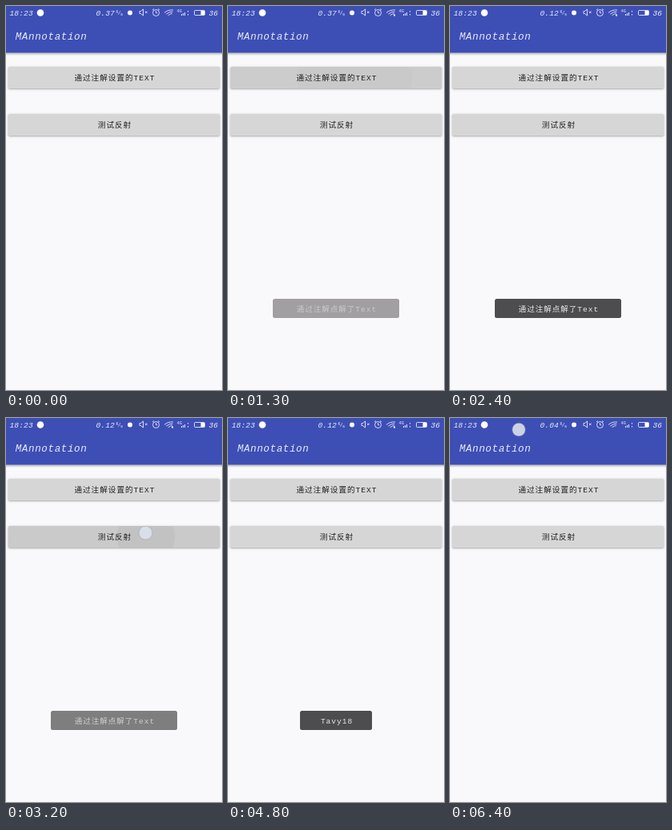
Write an HTML page with a canvas that moves like this. It is 270 px wide and 480 px high and loops after 6500 ms.

```html
<!DOCTYPE html>
<html lang="zh-CN">
<head>
<meta charset="utf-8">
<style>
html, body { margin: 0; width: 100%; height: 100%; overflow: hidden; background: #f9f8fa; }
canvas { display: block; width: 270px; height: 480px; }
</style>
</head>
<body>
<canvas id="stage" width="270" height="480"></canvas>
<script>
const ctx = document.getElementById('stage').getContext('2d');
const LOOP = 6500, STEP = 100;
const FAMILY = '"Liberation Mono", "Noto Sans CJK SC", "Noto Sans CJK", monospace';
const LIGHT = 'rgba(255,255,255,.88)';
const clamp = v => Math.max(0, Math.min(1, v));
const ramp = (t, from, to) => clamp((t - from) / (to - from));
const within = (t, from, to) => t >= from && t < to;

function text(str, x, y, size, { color = LIGHT, align = 'left', style = '', gap = 0 } = {}) {
  ctx.font = `${style} 300 ${size}px ${FAMILY}`;
  ctx.letterSpacing = `${gap}px`;
  ctx.textAlign = align;
  ctx.fillStyle = color;
  ctx.fillText(str, x, y);
}

function roundRect(x, y, w, h, r) {
  ctx.beginPath();
  ctx.roundRect(x, y, w, h, r);
}

function disc(x, y, r, color) {
  ctx.beginPath();
  ctx.arc(x, y, r, 0, Math.PI * 2);
  ctx.fillStyle = color;
  ctx.fill();
}

function line(...pts) {
  ctx.beginPath();
  for (let i = 0; i < pts.length; i += 2) ctx.lineTo(pts[i], pts[i + 1]);
  ctx.stroke();
}

function drawMute() {
  line(167, 6.5, 168.5, 6.5, 171.5, 4, 171.5, 12, 168.5, 9.5, 167, 9.5, 167, 6.5);
  line(174, 6.5, 176.5, 9);
  line(176.5, 6.5, 174, 9);
}

function drawAlarm() {
  ctx.beginPath();
  ctx.arc(187.5, 8.5, 4, 0, Math.PI * 2);
  ctx.stroke();
  line(187.5, 6, 187.5, 8.7, 189.3, 8.7);
  line(183, 5, 185, 3.5);
  line(190, 3.5, 192, 5);
}

function drawWifi(active) {
  for (let i = 0; i < 3; i++) {
    const x = 198 + i * 2.3, y = 8.5 + i * 1.6;
    ctx.beginPath();
    ctx.moveTo(x, y);
    ctx.quadraticCurveTo(x + 4, y - 4 + i * 0.6, 209 - i * 0.6, 5 + i * 2.3);
    ctx.stroke();
  }
  if (active) {
    ctx.fillStyle = '#fff';
    ctx.fillRect(207, 10.5, 2, 2);
  }
}

function drawSignal() {
  text('4G', 213.5, 8, 5.5);
  for (let i = 0; i < 3; i++) ctx.fillRect(219 + i * 2, 10 - i, 1, 2 + i);
  ctx.fillRect(227, 6, 1, 1.5);
  ctx.fillRect(227, 10, 1, 1.5);
}

function drawBattery() {
  roundRect(235.5, 5.5, 13, 6, 1);
  ctx.stroke();
  ctx.fillStyle = '#fff';
  ctx.fillRect(243.5, 6, 4.5, 5);
}

function drawHeader(t) {
  const shade = ctx.createLinearGradient(0, 58, 0, 62);
  shade.addColorStop(0, 'rgba(0,0,0,.3)');
  shade.addColorStop(1, 'rgba(0,0,0,0)');
  ctx.fillStyle = shade;
  ctx.fillRect(0, 58, 270, 4);
  ctx.fillStyle = '#3d4fb5';
  ctx.fillRect(0, 0, 270, 58.4);

  const speed = t < 2400 ? '0.37' : t < 5200 ? '0.12' : '0.04';
  const small = { style: 'italic', gap: 0.1 };
  text('18:23', 4.5, 12, 9.6, small);
  text(speed, 112.5, 12, 9.6, small);
  text('K', 137.5, 8.5, 5);
  text('/', 139.7, 10.5, 6.5);
  text('s', 142.7, 11.5, 6);
  text('36', 253.5, 12, 9.6, small);
  text('MAnnotation', 11.7, 42.3, 12.6, { style: 'italic', gap: 0.6 });

  disc(43, 8.5, 4.3, '#fff');
  disc(155, 8.5, 3, '#fff');
  ctx.strokeStyle = LIGHT;
  ctx.lineWidth = 0.9;
  drawMute();
  drawAlarm();
  drawWifi(within(t, 800, 3800) || within(t, 4800, 5800));
  drawSignal();
  drawBattery();
}

function drawButton(label, y, t, start, touchX, hold) {
  const x = 3, w = 264, h = 27;
  ctx.save();
  ctx.shadowColor = 'rgba(0,0,0,.38)';
  ctx.shadowBlur = 2.5;
  ctx.shadowOffsetY = 0.7;
  ctx.fillStyle = '#d6d6d6';
  roundRect(x, y, w, h, 1.5);
  ctx.fill();
  ctx.restore();

  const end = start + hold;
  if (within(t, start, end)) {
    const fade = 1 - 0.5 * ramp(t, start + 200, end);
    ctx.save();
    roundRect(x, y, w, h, 1.5);
    ctx.clip();
    ctx.fillStyle = `rgba(0,0,0,${0.055 * fade})`;
    ctx.fillRect(x, y, w, h);
    const grow = ramp(t, start, start + 300);
    disc(touchX + 5 - grow * 12, y + h / 2, 18 + 54 * grow, `rgba(0,0,0,${0.05 * fade * (1 - grow * 0.6)})`);
    ctx.restore();
  }
  text(label, 136, y + 16.8, 9.6, { color: '#222', align: 'center', gap: 1 });
}

function drawToast(label, w, alpha) {
  if (alpha <= 0) return;
  ctx.save();
  ctx.globalAlpha = alpha;
  ctx.fillStyle = '#4d4c4e';
  roundRect(135 - w / 2, 366, w, 24, 2.5);
  ctx.fill();
  text(label, 136, 381.8, 9.5, { align: 'center', gap: 1 });
  ctx.restore();
}

function drawTouch(x, y) {
  disc(x, y, 9, 'rgba(150,155,170,.3)');
  disc(x, y, 8, 'rgba(225,229,240,.85)');
}

function render(now) {
  const t = Math.floor((now % LOOP) / STEP) * STEP;
  ctx.fillStyle = '#f9f8fa';
  ctx.fillRect(0, 0, 270, 480);
  drawHeader(t);
  drawButton('通过注解设置的TEXT', 76, t, 1000, 165, 500);
  drawButton('测试反射', 135, t, 3100, 174, 400);

  const first = ramp(t, 1160, 1435) * (1 - ramp(t, 3135, 3360));
  const second = ramp(t, 3250, 3468) * (1 - ramp(t, 5140, 5370));
  drawToast('通过注解点解了Text', 158, first);
  drawToast('Tavy18', 90, second);

  if (within(t, 1000, 1200)) drawTouch(165, 87);
  if (within(t, 3100, 3300)) drawTouch(174.5, 143.5);
  if (t >= 6400) drawTouch(86, 14.5);
}

const begin = performance.now();
function tick() {
  render(performance.now() - begin);
  requestAnimationFrame(tick);
}
tick();
</script>
</body>
</html>
```
